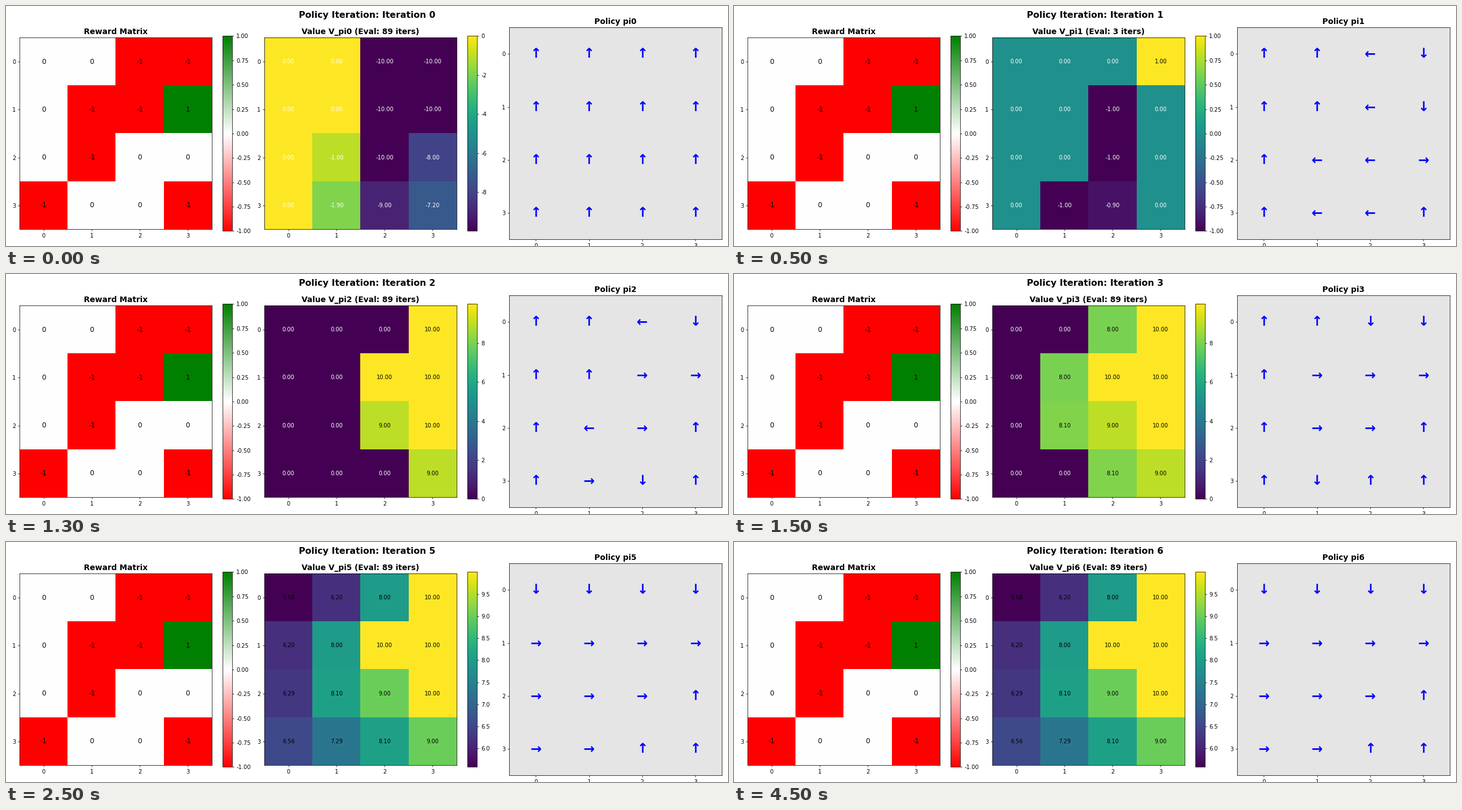
Write a matplotlib script that moves like this. It is 1280 by 427 pixels and loops after 5.5 s.

```python
import numpy as np
import matplotlib.pyplot as plt
from matplotlib.animation import FuncAnimation
from matplotlib.colors import LinearSegmentedColormap

plt.rcParams["font.family"] = "DejaVu Sans"
plt.rcParams["axes.unicode_minus"] = False

W, H = 1280, 427
N = 4
GAMMA = 0.9
THETA = 1e-4
LAST = 6          # final policy index, held to the end of the loop
FRAMES = 11
CELLS = [(r, c) for r in range(N) for c in range(N)]

REWARD = np.array([[0, 0, -1, -1],
                   [0, -1, -1, 1],
                   [0, -1, 0, 0],
                   [-1, 0, 0, -1]])
MOVES = [(-1, 0), (1, 0), (0, -1), (0, 1)]
ARROWS = "↑↓←→"


def action_value(values, cell, action):
    """Reward of the entered cell plus its discounted value; walls block."""
    r, c = (min(max(p + d, 0), N - 1) for p, d in zip(cell, MOVES[action]))
    return REWARD[r, c] + GAMMA * values[r, c]


def evaluate(policy):
    values = np.zeros((N, N))
    sweeps = 0
    while True:
        new = np.zeros((N, N))
        for cell in CELLS:
            new[cell] = action_value(values, cell, policy[cell])
        delta = np.abs(new - values).max()
        values = new
        sweeps += 1
        if delta < THETA:
            return values, sweeps


def improve(values):
    policy = np.zeros((N, N), int)
    for cell in CELLS:
        policy[cell] = np.argmax([action_value(values, cell, a) for a in range(4)])
    return policy


def run_iterations():
    steps = []
    policy = np.zeros((N, N), int)
    for _ in range(LAST + 1):
        values, sweeps = evaluate(policy)
        steps.append((policy, values, sweeps))
        policy = improve(values)
    return steps


STEPS = run_iterations()

fig = plt.figure(figsize=(18, 6.0048), dpi=W / 18, facecolor="white")

# Layout in pixels: three columns sharing one vertical centre
COL_X = [24.1, 458.1, 892.1]
COL_W = 377.2
MID_Y = 226.9
MAP_W = 0.904 * COL_W
BAR_X = 0.954 * COL_W
BAR_W = 0.046 * COL_W


def add_axes(x, w, h):
    return fig.add_axes([x / W, 1 - (MID_Y + h / 2) / H, w / W, h / H])


def add_grid(x, size, title):
    ax = add_axes(x, size, size)
    ax.set(xlim=(-0.5, N - 0.5), ylim=(N - 0.5, -0.5),
           xticks=range(N), yticks=range(N))
    ax.set_title(title, fontsize=14, fontweight="bold")
    return ax


def add_heatmap(x, title, data, cmap):
    ax = add_grid(x, MAP_W, title)
    image = ax.imshow(data, cmap=cmap, vmin=-1, vmax=1, aspect="auto")
    fig.colorbar(image, cax=add_axes(x + BAR_X, BAR_W, 20 * BAR_W))
    return ax, image


def add_labels(ax, **style):
    return {(r, c): ax.text(c, r, "", ha="center", va="center", **style)
            for r, c in CELLS}


heading = fig.suptitle("", fontsize=16, fontweight="bold")

red_green = LinearSegmentedColormap.from_list("reward", ["red", "white", "green"])
reward_ax, _ = add_heatmap(COL_X[0], "Reward Matrix", REWARD, red_green)
for cell, label in add_labels(reward_ax, fontsize=12).items():
    label.set_text(str(REWARD[cell]))

value_ax, value_map = add_heatmap(COL_X[1], "", np.zeros((N, N)), "viridis")
value_labels = add_labels(value_ax, fontsize=10)

policy_ax = add_grid(COL_X[2], COL_W, "")
policy_ax.set_facecolor("#e5e5e5")
policy_labels = add_labels(policy_ax, fontsize=24, fontweight="bold", color="blue")


def update(frame):
    k = min(frame, LAST)
    policy, values, sweeps = STEPS[k]
    heading.set_text(f"Policy Iteration: Iteration {k}")
    value_ax.set_title(f"Value V_pi{k} (Eval: {sweeps} iters)",
                       fontsize=14, fontweight="bold")
    policy_ax.set_title(f"Policy pi{k}", fontsize=14, fontweight="bold")
    value_map.set_data(values)
    value_map.set_clim(values.min(), values.max())
    for cell in CELLS:
        value_labels[cell].set_text(f"{values[cell]:.2f}")
        value_labels[cell].set_color("black" if values[cell] > 0 else "white")
        policy_labels[cell].set_text(ARROWS[policy[cell]])
    return []


anim = FuncAnimation(fig, update, frames=FRAMES, interval=500,
                     init_func=lambda: update(0), repeat=True, repeat_delay=0)
plt.show()
```
